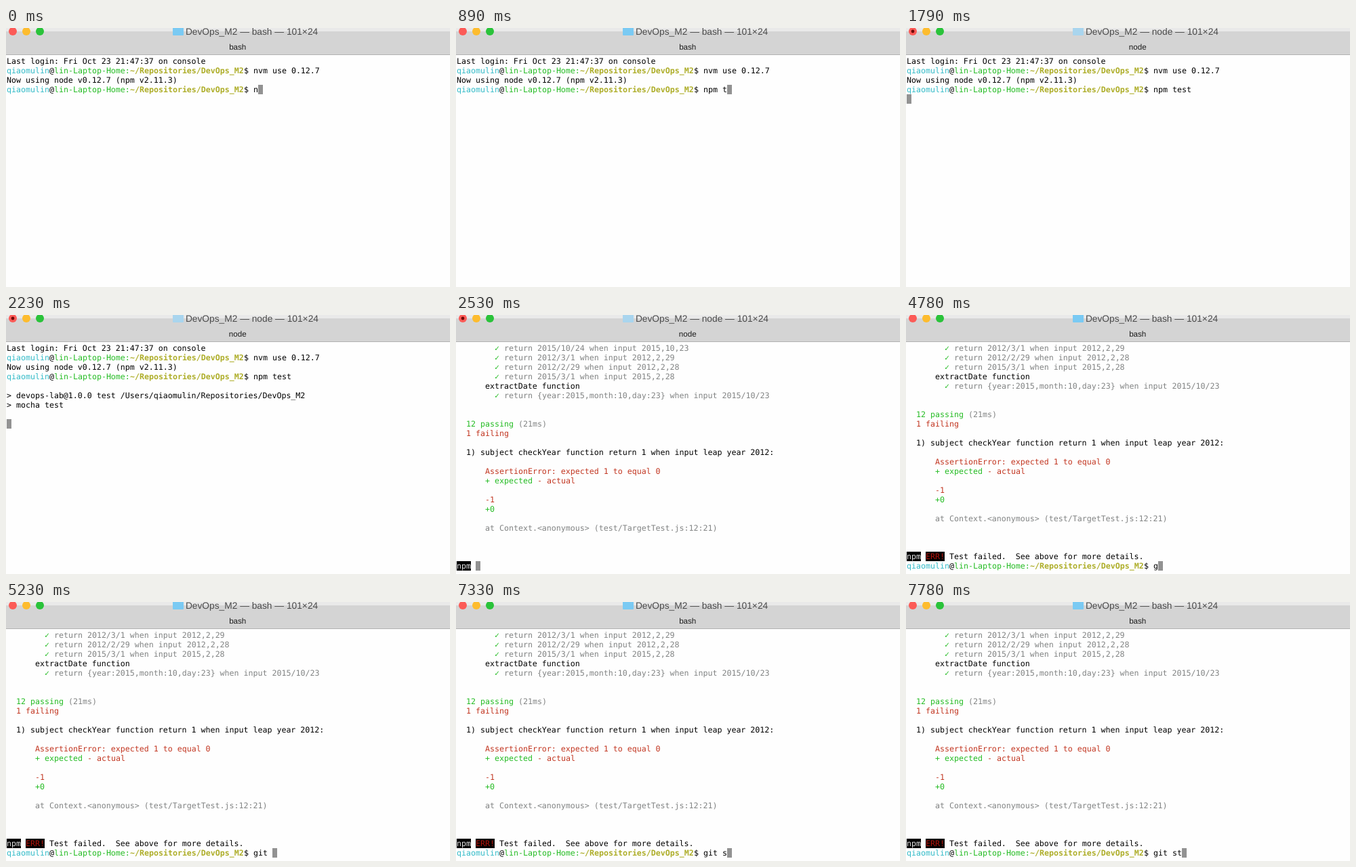
These frames come from a looping animation (655 by 383 pixels, 8000 ms). An HTML page:

```html
<!DOCTYPE html>
<html lang="en">
<head>
<meta charset="utf-8">
<title>Terminal</title>
<style>
  html, body { margin: 0; width: 100%; height: 100%; overflow: hidden; background: #fff; }
  svg { display: block; }
  text { white-space: pre; text-rendering: geometricPrecision; }
  .ui { font-family: "Liberation Sans", Arial, sans-serif; }
  .mono { font: 11.627px "DejaVu Sans Mono", monospace; fill: #000; }
  .cyan { fill: #33bbc8; }
  .green { fill: #25bc24; }
  .yellow { fill: #adad27; font-weight: bold; }
  .red { fill: #c23621; }
  .gray { fill: #818383; }
  .inverse { fill: #e6e6e6; }
  .error { fill: #b5150c; }
</style>
</head>
<body>
<svg width="655" height="383" viewBox="0 0 655 383">
  <rect width="655" height="383" fill="#fefefe"/>
  <rect width="655" height="5" fill="#e9e9e9"/>
  <rect y="5" width="655" height="34" fill="#d4d4d4"/>
  <rect y="39" width="655" height="1" fill="#b1b1b1"/>
  <circle cx="10" cy="5" r="6" fill="#fc5b57"/>
  <circle cx="30" cy="5" r="6" fill="#fdbc2e"/>
  <circle cx="50" cy="5" r="6" fill="#2ac33a"/>
  <circle id="busy" cx="10" cy="5" r="2.4" fill="#6e0a08"/>
  <path id="folder" d="M246 0h16v10q0 1-1 1h-14q-1 0-1-1z"/>
  <text id="title" class="ui" x="264.9" y="10" font-size="13.75" fill="#4b4b4b"></text>
  <text id="tab" class="ui" x="341.7" y="32" font-size="11.6" fill="#1c1c1c" text-anchor="middle"></text>
  <g id="screen"></g>
</svg>
<script>
const LOOP = 8000, ROWS = 24, CELL_W = 7, CELL_H = 14, LEFT = 1, TOP = 42;
const el = id => document.getElementById(id);

// A line is a list of [text, style] runs.
const plain = text => [[text, '']];
const styled = (indent, text, style) => [[' '.repeat(indent), ''], [text, style]];
const check = text => [...styled(8, '✓', 'green'), [' ' + text, 'gray']];
const prompt = command => [
  ['qiaomulin', 'cyan'], ['@', ''], ['lin-Laptop-Home:', 'green'],
  ['~/Repositories/DevOps_M2', 'yellow'], ['$ ' + command, '']
];
const blank = [];

const login = [
  plain('Last login: Fri Oct 23 21:47:37 on console'),
  prompt('nvm use 0.12.7'),
  plain('Now using node v0.12.7 (npm v2.11.3)')
];

const started = [
  ...login, prompt('npm test'), blank,
  plain('> devops-lab@1.0.0 test /Users/qiaomulin/Repositories/DevOps_M2'),
  plain('> mocha test'),
  blank, blank
];

const report = [
  check('return 2015/10/24 when input 2015,10,23'),
  check('return 2012/3/1 when input 2012,2,29'),
  check('return 2012/2/29 when input 2012,2,28'),
  check('return 2015/3/1 when input 2015,2,28'),
  plain('      extractDate function'),
  check('return {year:2015,month:10,day:23} when input 2015/10/23'),
  blank, blank,
  [...styled(2, '12 passing', 'green'), [' (21ms)', 'gray']],
  styled(2, '1 failing', 'red'),
  blank,
  plain('  1) subject checkYear function return 1 when input leap year 2012:'),
  blank,
  styled(6, 'AssertionError: expected 1 to equal 0', 'red'),
  [...styled(6, '+ expected', 'green'), [' - actual', 'red']],
  blank,
  styled(6, '-1', 'red'),
  styled(6, '+0', 'green'),
  blank,
  styled(6, 'at Context.<anonymous> (test/TargetTest.js:12:21)', 'gray'),
  blank, blank, blank
];

const npmTag = ['npm', 'inverse'];
const failure = [npmTag, [' ', ''], ['ERR!', 'error'], [' Test failed.  See above for more details.', '']];

const testing = typed => [...login, prompt(typed)];
const finished = typed => [...report, failure, prompt(typed)];

// [start time, running process, lines]; the cursor follows the last line.
const steps = [
  ...[[0, 'n'], [140, 'np'], [440, 'npm'], [590, 'npm '], [890, 'npm t'], [1040, 'npm tes'], [1340, 'npm test']]
    .map(([at, typed]) => [at, 'bash', testing(typed)]),
  [1640, 'bash', [...testing('npm test'), blank]],
  [1790, 'node', [...testing('npm test'), blank]],
  [2230, 'node', started],
  [2530, 'node', [...report, [npmTag, [' ', '']]]],
  ...[[2680, ''], [4780, 'g'], [4930, 'gi'], [5080, 'git'], [5230, 'git '], [7330, 'git s'], [7780, 'git st']]
    .map(([at, typed]) => [at, 'bash', finished(typed)])
];

const escapeText = s => s.replace(/&/g, '&amp;').replace(/</g, '&lt;');
const block = (col, row, width, fill) =>
  `<rect x="${LEFT + col * CELL_W}" y="${TOP + row * CELL_H}" width="${width * CELL_W}" height="${CELL_H}" fill="${fill}"/>`;

function renderScreen(lines) {
  let svg = '', col = 0;
  const visible = lines.slice(-ROWS);
  visible.forEach((line, row) => {
    col = 0;
    for (const [text, style] of line) {
      if (style === 'inverse' || style === 'error') svg += block(col, row, text.length, '#000');
      if (text.trim()) {
        svg += `<text class="mono ${style}" x="${LEFT + col * CELL_W}" y="${TOP + row * CELL_H + 11}">${escapeText(text)}</text>`;
      }
      col += text.length;
    }
  });
  return svg + block(col, visible.length - 1, 1, '#929292');
}

let shown;
function draw(time) {
  const step = steps.findLast(([at]) => at <= time);
  if (step === shown) return;
  shown = step;
  const [, process, lines] = step;
  const busy = process === 'node';
  el('busy').setAttribute('visibility', busy ? 'visible' : 'hidden');
  el('folder').setAttribute('fill', busy ? '#a9d5ee' : '#7acaf3');
  el('title').textContent = `DevOps_M2 — ${process} — 101×24`;
  el('tab').textContent = process;
  el('screen').innerHTML = renderScreen(lines);
}

const start = performance.now();
function tick() {
  draw((performance.now() - start) % LOOP);
  requestAnimationFrame(tick);
}
tick();
</script>
</body>
</html>
```
